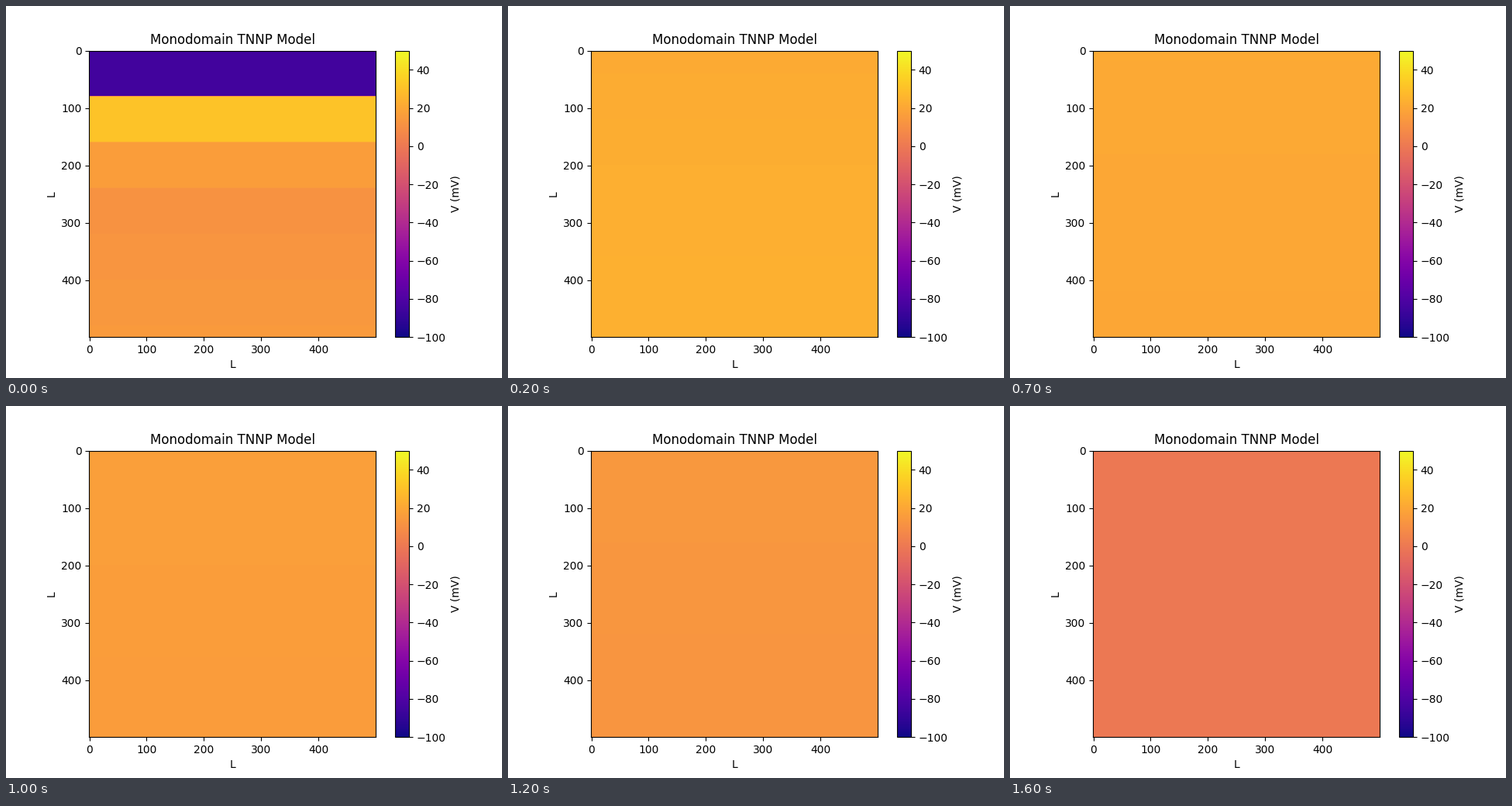
Recreate the animation shown at these times as a matplotlib script. Size 640 by 480 pixels, loop 10 s.

```python
import matplotlib.pyplot as plt
import numpy as np
from matplotlib.animation import FuncAnimation

SIZE = 500      # rows and columns of the tissue, also rows travelled per step
BAND = 80       # rows that share one voltage sample
REST = -84.5    # mV ahead of the wave front
END = 100       # age at which the wave freezes
FRAMES = 100
CHANGES = [0, 1, 2, *range(7, 15), 16]  # the picture rests in between


def action_potential(age):
    """Voltage in mV: upstroke spike, notch, plateau, then repolarisation."""
    plateau = 30.8 - 0.22 * age
    spike = 21 * np.exp(-1.3 * (age - 1) ** 2)
    notch = 21.3 * np.exp(-(age / 11) ** 1.5)
    drop = 8.8 * np.exp((age - END) / 6.5)
    return np.where(age < 1, REST, plateau + spike - notch - drop)


def voltage(n):
    step = max(c for c in CHANGES if c <= n)
    age = (np.arange(SIZE) + SIZE * step) // BAND
    column = action_potential(np.minimum(age, END))
    return np.tile(column[:, None], (1, SIZE))


fig, ax = plt.subplots(figsize=(6.4, 4.8), dpi=100)
image = ax.imshow(voltage(0), cmap="plasma", vmin=-100, vmax=50)
fig.colorbar(image, ax=ax, label="V (mV)")
ax.set(title="Monodomain TNNP Model", xlabel="L", ylabel="L")


def update(n):
    image.set_data(voltage(n))
    return [image]


anim = FuncAnimation(fig, update, frames=FRAMES, interval=100,
                     repeat=True, repeat_delay=0)
plt.show()
```
